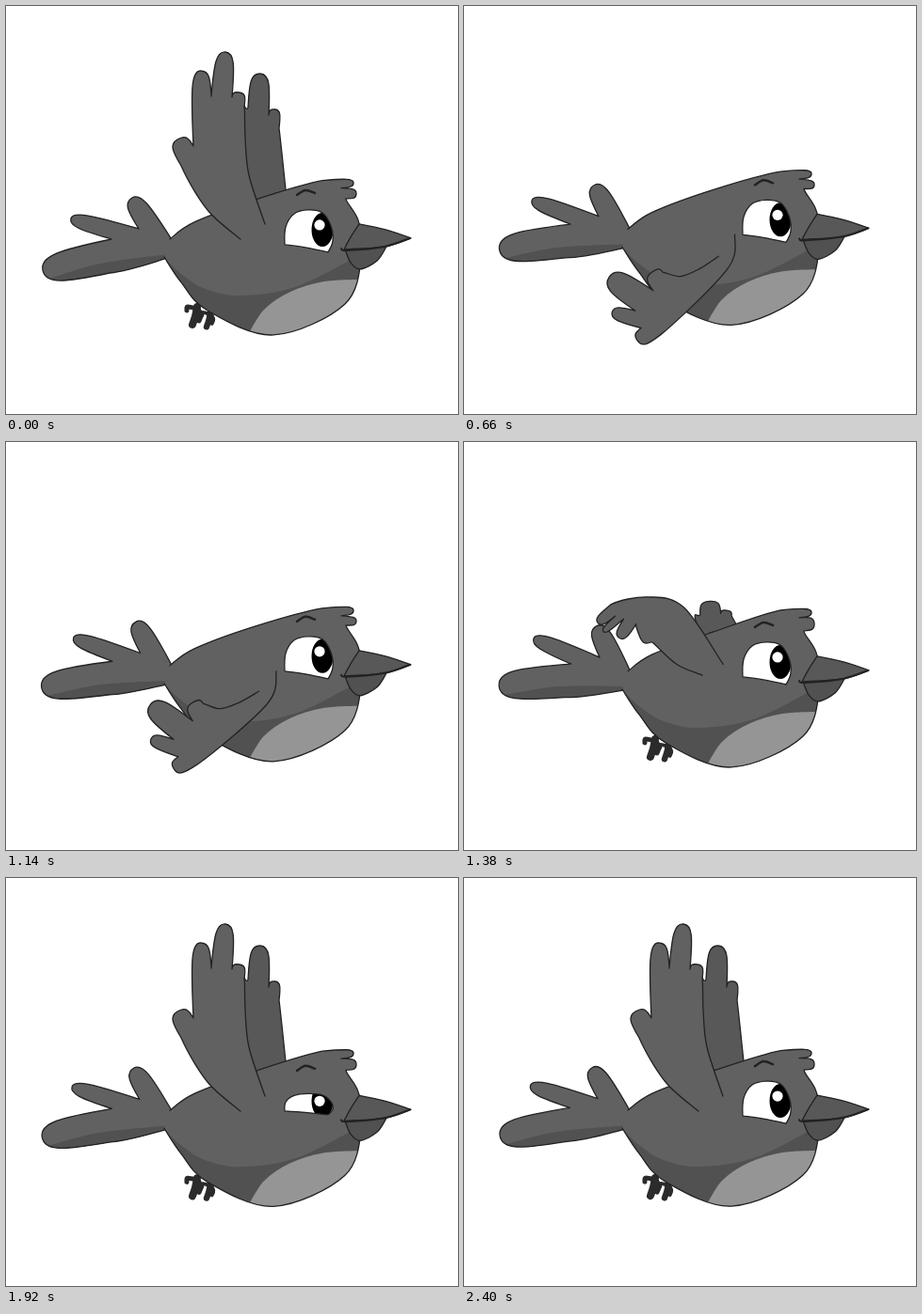
An HTML page with a canvas for the animation above (2.43 s loop, 480 by 434 pixels).

```html
<!DOCTYPE html>
<html lang="en">
<head>
<meta charset="utf-8">
<title>Flying bird</title>
<style>
html, body { margin: 0; width: 100%; height: 100%; overflow: hidden; background: #fff; }
canvas { display: block; width: 480px; height: 434px; }
</style>
</head>
<body>
<canvas id="stage" width="480" height="434"></canvas>
<script>
const ctx = document.getElementById('stage').getContext('2d');
const LOOP = 2430, STEP = 30, BEAT = LOOP / 5, LEAD = 30;
const INK = '#222', BODY = '#616161', SHADE = '#515151', FAR = '#585858', BELLY = '#959595';

const pts = s => s.trim().split(/\s+/).map(p => p.split(',').map(Number));
const mix = (a, b, k) => Array.isArray(a) ? a.map((v, i) => mix(v, b[i], k)) : a + (b - a) * k;
const add = (p, q, k) => [p[0] + q[0] * k, p[1] + q[1] * k];
const sub = (p, q) => add(p, q, -1);
const dot = (p, q) => p[0] * q[0] + p[1] * q[1];

// A rounded feather rising from notch a to a tip and back to notch b.
function feather(path, a, tip, b) {
  const axis = sub(tip, mix(a, b, .5)), size = Math.hypot(...axis);
  const u = [axis[0] / size, axis[1] / size], base = sub(b, a);
  const side = add(base, u, -dot(base, u));
  const rise = p => add(p, u, dot(sub(tip, p), u) * .72);
  path.bezierCurveTo(...rise(a), ...add(tip, side, -.45), ...tip);
  path.bezierCurveTo(...add(tip, side, .45), ...rise(b), ...b);
}

// Smooth line through points; `tips` are feather ends, `corners` are sharp.
function outline(p, { tips = [], corners = [], close = false } = {}) {
  const path = new Path2D(), last = p.length - 1;
  const slope = i => corners.includes(i) ? [0, 0]
    : sub(p[Math.min(last, i + 1)], p[Math.max(0, i - 1)]);
  path.moveTo(...p[0]);
  for (let i = 0; i < last; i++) {
    if (tips.includes(i + 1)) {
      feather(path, p[i], p[i + 1], p[i + 2]);
      i++;
    } else {
      path.bezierCurveTo(...add(p[i], slope(i), 1 / 6), ...add(p[i + 1], slope(i + 1), -1 / 6), ...p[i + 1]);
    }
  }
  if (close) path.closePath();
  return path;
}

function paint(path, fill, width = 1.3) {
  if (fill) { ctx.fillStyle = fill; ctx.fill(path); }
  if (width) { ctx.lineWidth = width; ctx.strokeStyle = INK; ctx.stroke(path); }
}

function clipped(path, draw) {
  ctx.save();
  ctx.clip(path);
  draw();
  ctx.restore();
}

function ellipse(x, y, rx, ry, fill) {
  ctx.beginPath();
  ctx.ellipse(x, y, rx, ry, 0, 0, 7);
  ctx.fillStyle = fill;
  ctx.fill();
}

// Wing poses are polar around the shoulder, so that they swing.
const SHOULDER = [277, 238];
const polar = p => {
  const [x, y] = sub(p, SHOULDER), a = Math.atan2(y, x);
  return [a > 0 ? a - 2 * Math.PI : a, Math.hypot(x, y)];
};
const place = ([a, r]) => add(SHOULDER, [Math.cos(a), Math.sin(a)], r);

const up = pts(`249,248 214,217 186,170 182,142 199,149 206,69 218,96 233,49 240,97 248,92 253,107
  254,140 258,180 275,232`).map(polar);
const fall = pts(`280,247 255,263 175,262 157,252 167,246 159,219 174,232 179,196 197,231 207,219 214,226
  222,239 238,246 257,250`).map(polar);
const fold = pts(`252,246 226,233 203,209 190,201 187,189 168,204 173,183 150,197 163,179 143,186 158,166
  200,159 238,172 276,237`).map(polar);
const low = fall.map(([a, r]) => [a - 1.3, r * 1.4]);

const TIMES = [0, 30, 132, 250, 444, BEAT];
const NEAR = [up, up, fall, low, fold, up];
// Far wing: turn, width, length.
const rest = [0, 1, 1];
const FAR_MOVES = [rest, rest, [-1.31, .5, .47], [-1.9, .5, .4], [-.14, 1, .34], rest];
const FAR_ROOT = [282, 215];
const FAR_WING = pts('255,215 251,112 257,108 270,72 279,116 286,110 290,130 298,205');

function pose(keys, phase) {
  let i = 0;
  while (phase >= TIMES[i + 1]) i++;
  return mix(keys[i], keys[i + 1], (phase - TIMES[i]) / (TIMES[i + 1] - TIMES[i]));
}

function farWing(phase) {
  const [turn, wide, long] = pose(FAR_MOVES, phase), c = Math.cos(turn), s = Math.sin(turn);
  const shape = FAR_WING.map(p => {
    const x = (p[0] - FAR_ROOT[0]) * wide, y = (p[1] - FAR_ROOT[1]) * long;
    return add(FAR_ROOT, [x * c - y * s, x * s + y * c], 1);
  });
  paint(outline(shape, { tips: [3, 5] }), FAR);
}

const tailPath = outline(pts('172,268 110,284 39,281 112,248 69,226 141,237 134,204 175,247'), { tips: [2, 4, 6] });
const tailShade = outline(pts('40,292 100,274 174,264 174,300 40,310'), { corners: [2, 3, 4] });
const BODY_PTS = pts(`174,248 200,230 265,206 336,185 369,187 356,193 372,199 361,205 374,228 378,262
  360,317 284,350 214,324 186,294 168,267`);
const shadePath = outline(pts('164,264 186,285 212,301 250,308 310,298 380,262 400,370 160,370'), { corners: [0, 5, 6, 7] });
const bellyPath = outline(pts('257,350 274,323 302,304 338,293 382,291 390,370 260,370'), { corners: [0, 4, 5, 6] });
const beakTop = outline(pts('359,259 366,246 375,232 403,238 430,247 402,256 359,259'), { corners: [2, 4] });
const beakLow = outline(pts('360,259 366,273 376,280 394,271 404,256'), { close: true });
const mouth = outline(pts('356,258 362,260 402,256 429,247'));
const EYE = pts('296,254 297,235 306,221 321,217 336,220 345,234 347,250 342,262 318,257 296,254');
const EYE_LINE = 243;

function tail(angle) {
  ctx.save();
  ctx.translate(172, 258);
  ctx.rotate(angle * Math.PI / 180);
  ctx.translate(-172, -258);
  paint(tailPath, BODY, 0);
  clipped(tailPath, () => paint(tailShade, SHADE, 0));
  paint(tailPath);
  ctx.restore();
}

function foot(x, y, size) {
  ctx.lineWidth = 8 * size;
  ctx.strokeStyle = '#2b2b2b';
  ctx.stroke(outline([[x, y], [x - 2 * size, y + 10 * size], [x - 5 * size, y + 19 * size]]));
  ctx.lineWidth = 5 * size;
  ctx.stroke(outline([[x, y + 2], [x - 10 * size, y], [x - 11 * size, y + 4 * size]]));
  ctx.stroke(outline([[x, y], [x + 4 * size, y + 9 * size], [x + 2 * size, y + 15 * size]]));
}

function body(droop) {
  const shape = BODY_PTS.map(([x, y], i) => [x, i > 2 && i < 7 ? y + droop : y]);
  const path = outline(shape, { tips: [4, 6] });
  paint(path, BODY, 0);
  clipped(path, () => {
    paint(shadePath, SHADE, 0);
    paint(bellyPath, BELLY, 0);
  });
  paint(path);
}

function eye(shut) {
  const shape = EYE.map(([x, y]) => [x, mix(y, EYE_LINE, shut)]);
  const path = outline(shape, { corners: [0, 7, 9] });
  paint(path, '#fff', 0);
  clipped(path, () => {
    ellipse(336, 238, 11.5, 18, '#000');
    ellipse(333, 233 + shut * 10, 5.6, 5.6, '#fff');
  });
  paint(path);
  const y = 201 + shut * 9;
  paint(outline([[309, y], [318, y - 5], [328, y - 2]]), null, 2.5);
}

function draw(time) {
  const phase = (time + LEAD) % BEAT;
  const wave = lag => Math.cos(2 * Math.PI * (phase - lag) / BEAT);
  const blink = Math.max(0, 1 - Math.abs(time - 1960) / 80);
  ctx.fillStyle = '#fff';
  ctx.fillRect(0, 0, 480, 434);
  ctx.lineJoin = ctx.lineCap = 'round';

  farWing(phase);
  ctx.save();
  ctx.translate(0, 7 * wave(40) - 7);
  tail(5.8 - 8.2 * wave(90));
  foot(203, 320, 1);
  foot(217, 326, .8);
  body(3 * wave(132));
  paint(beakLow, SHADE);
  paint(beakTop, FAR);
  paint(mouth, null, 2);
  eye(blink);
  ctx.restore();

  const wing = pose(NEAR, phase).map(place);
  paint(outline(wing, { tips: [3, 5, 7, 9] }), BODY);
}

const start = performance.now();
function frame() {
  const t = (performance.now() - start) % LOOP;
  draw(Math.floor(t / STEP) * STEP);
  requestAnimationFrame(frame);
}
frame();
</script>
</body>
</html>
```
